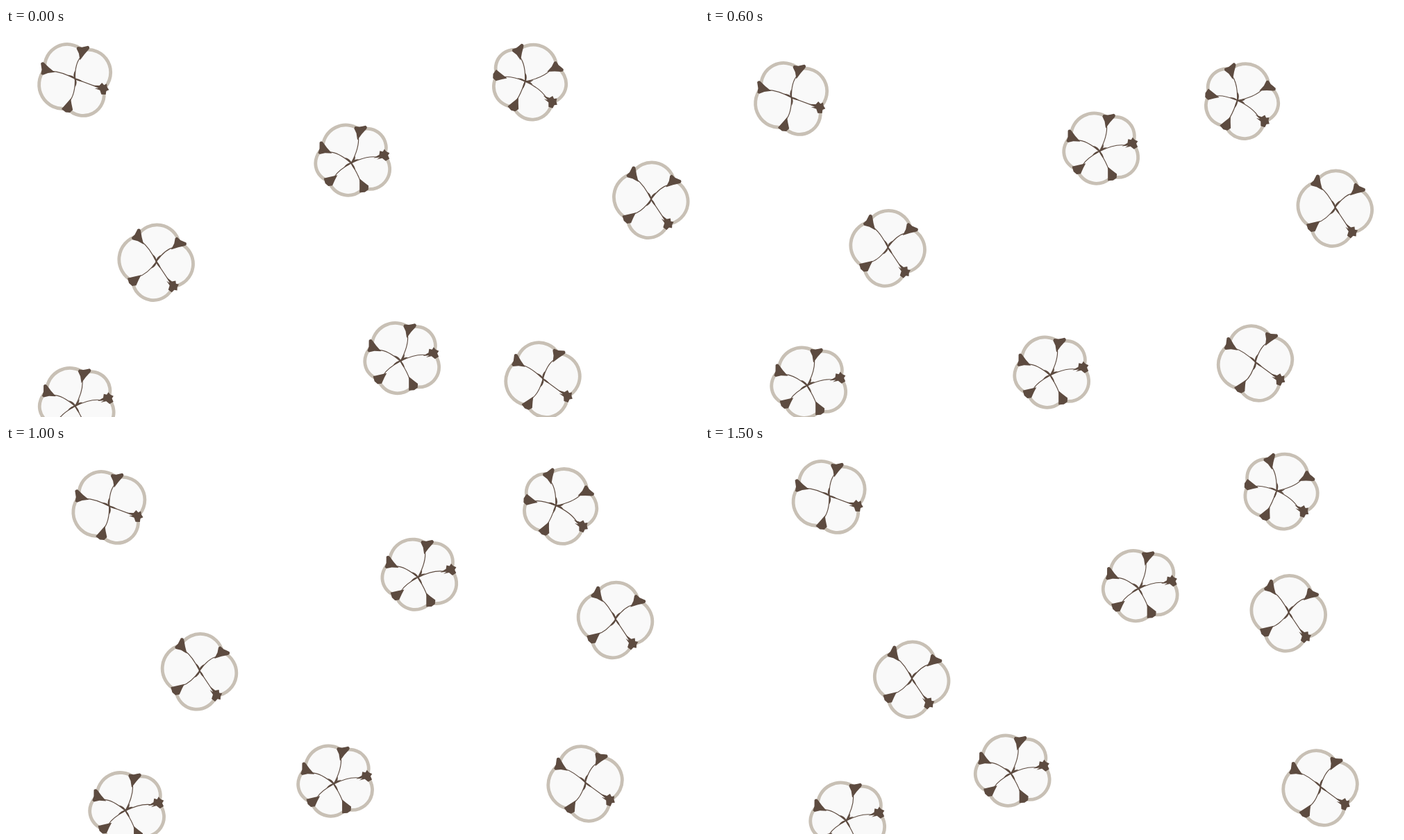
Write an HTML page that moves like this. It is 998 px wide and 561 px high and loops after 1.6 s.

```html
<!DOCTYPE html>
<html lang="en">
<head>
<meta charset="utf-8">
<title>Drifting cotton</title>
<style>
html, body { margin: 0; width: 100%; height: 100%; overflow: hidden; background: #fff; }
svg { display: block; width: 100vw; height: 100vh; }
.petals { fill: #f9f9f9; stroke: #c8c0b5; stroke-width: 4.8; stroke-linejoin: round; }
.vein { fill: none; stroke: #5d4b40; stroke-width: 1.15; }
.sepal { fill: #5d4b40; }
</style>
</head>
<body>
<svg id="stage" viewBox="0 0 998 561"></svg>
<script>
const STEP = 100, LOOP = 1600, TURN = 6, LAST = 15;

// sepal outlines, pointing along +x, with the tail towards the centre
const sepals = {
  crown: "M-15 0L-6-4L0-9L3-8.5L4-2L6 2L8 6Q7 10 3 8L-5 4Z",
  wedge: "M-15-1L-8-4L0-8L5-5L6 1L3 8L-7 3Z",
  tuft: "M-16 0L-7-3L-5-8L-1-6L2-9L4-5L8-2L5 1L6 6L0 8L-4 3L-12 3L-7 1Z"
};

// joints between petals, clockwise: x, y, bulge of the next petal, bend of the vein, sepal
const shapes = {
  four: [
    [-27, -37, 21, 2, "crown"],
    [33, -27, 24.5, -3, "crown"],
    [24, 36, 23.5, 0, "tuft"],
    [-34, 28, 23, -3, "wedge"]
  ],
  five: [
    [13, -48, 17, 3, "crown"],
    [48, -11, 21.5, -3, "tuft"],
    [18, 36, 15, -1, "wedge"],
    [-32, 26, 14.5, 2, "wedge"],
    [-41, -21, 19, 3, "crown"]
  ]
};

// shape, angle, then the centre at the start, at the turn and at the last step
const bolls = [
  ["four", -36, [99.5, 73.3], [124.5, 100.3], [179, 73.3]],
  ["five", 51, [747.5, 77], [766.5, 104.5], [823, 66]],
  ["five", 0, [497, 195], [568, 178], [624.5, 207.5]],
  ["four", 0, [929, 247], [907.5, 259], [840.5, 241.5]],
  ["four", 0, [216.4, 337], [263.4, 316.5], [297.9, 337]],
  ["five", 0, [99.5, 545.5], [147, 516], [203, 542]],
  ["five", 0, [568, 480.5], [497, 501], [440.5, 474]],
  ["four", -20, [773.3, 506], [792.8, 482], [886.3, 493]]
];

const stage = document.getElementById("stage");

function add(parent, tag, attrs = {}) {
  const node = document.createElementNS(stage.namespaceURI, tag);
  for (const key in attrs) node.setAttribute(key, attrs[key]);
  return parent.appendChild(node);
}

function outline(joints) {
  let d = `M${joints[0][0]} ${joints[0][1]}`;
  joints.forEach(([x, y, bulge], i) => {
    const [nx, ny] = joints[(i + 1) % joints.length];
    const half = Math.hypot(nx - x, ny - y) / 2;
    const r = (half * half + bulge * bulge) / (2 * bulge);
    d += `A${r} ${r} 0 0 1 ${nx} ${ny}`;
  });
  return d + "Z";
}

function makeBoll([shape]) {
  const boll = add(stage, "g"), joints = shapes[shape];
  add(boll, "path", { class: "petals", d: outline(joints) });
  for (const [x, y, , bend, kind] of joints) {
    const angle = Math.atan2(y, x) * 180 / Math.PI, len = Math.hypot(x, y);
    const arm = add(boll, "g", { transform: `rotate(${angle})` });
    add(arm, "path", { class: "vein", d: `M0 0Q${len / 2} ${bend * 2} ${len - 10} 0` });
    add(arm, "path", { class: "sepal", d: `M-2 0Q5 ${bend - 2.5} 12 ${bend}Q5 ${bend + 2.5}-2 0Z` });
    add(arm, "path", { class: "sepal", d: sepals[kind], transform: `translate(${len})` });
  }
  return boll;
}

const nodes = bolls.map(makeBoll);

const mix = (a, b, k) => a.map((v, i) => v + (b[i] - v) * k);

function draw(ms) {
  const n = Math.floor(ms % LOOP / STEP);
  bolls.forEach(([, angle, from, turn, to], i) => {
    const [x, y] = n <= TURN ? mix(from, turn, n / TURN)
      : mix(turn, to, (n - TURN) / (LAST - TURN));
    nodes[i].setAttribute("transform", `translate(${x} ${y}) rotate(${angle})`);
  });
}

const start = performance.now();
function tick() {
  draw(performance.now() - start);
  requestAnimationFrame(tick);
}
tick();
</script>
</body>
</html>
```
